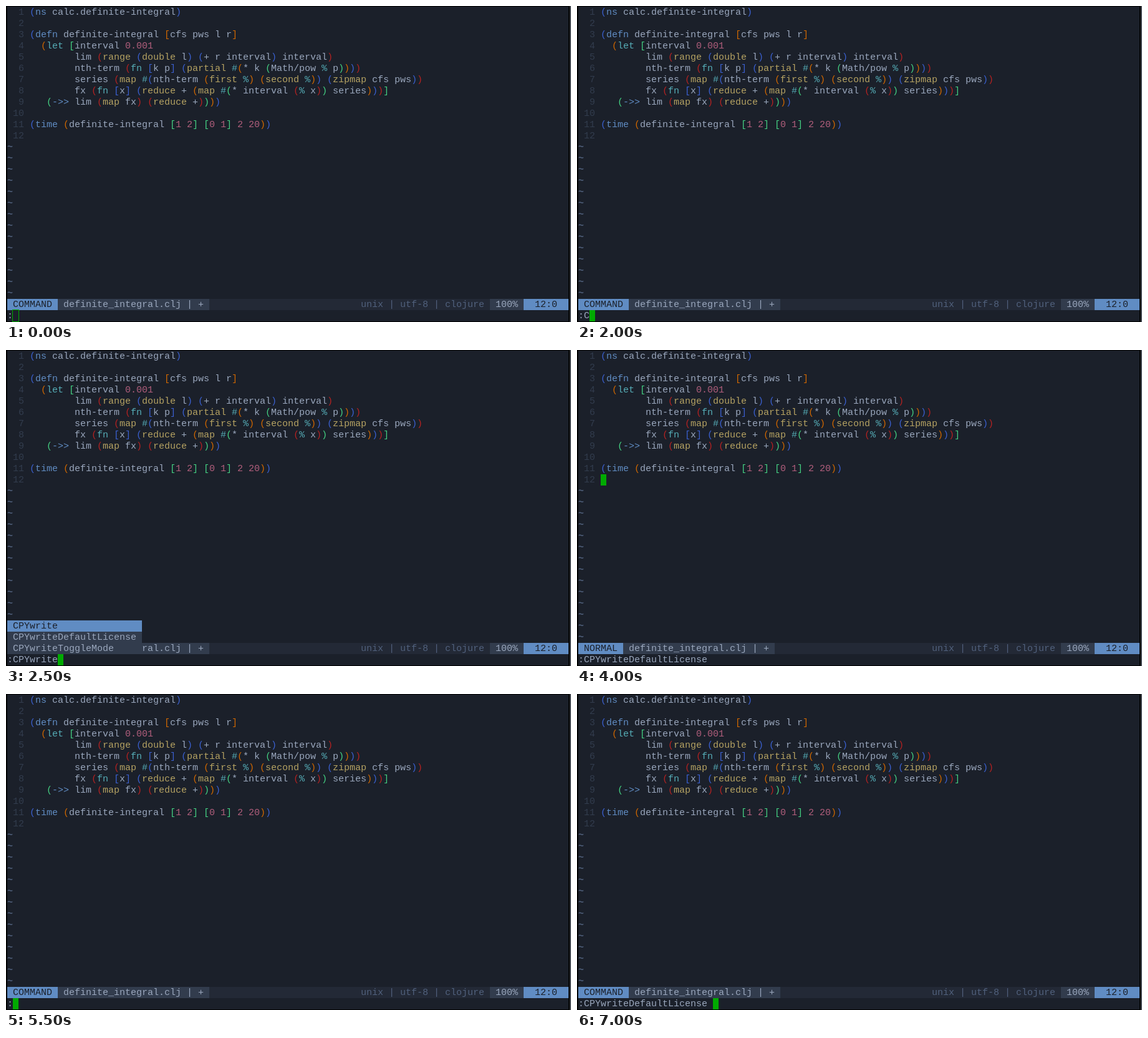
Animation of 906 by 506 pixels, one loop 8 s. Source, as an HTML page:

```html
<!DOCTYPE html>
<html lang="en">
<head>
<meta charset="utf-8">
<title>Editor session</title>
<style>
  html, body { margin: 0; width: 100%; height: 100%; overflow: hidden; background: #1b202a; }
  #stage { position: absolute; left: 0; top: 0; width: 906px; height: 506px; overflow: hidden;
    background: #1b202a; font: 15px/20px "Liberation Mono", monospace; }
  #stage span { position: absolute; height: 18px; white-space: pre; }
  #frame { position: absolute; left: 0; top: 0; width: 900px; height: 504px;
    border: solid #000; border-width: 1px 2px; }
  #edge { position: absolute; left: 904px; top: 0; width: 2px; height: 506px; background: #4a4e56; }
  #cursor { position: absolute; box-sizing: border-box; }
</style>
</head>
<body>
<div id="stage">
  <div id="frame"></div>
  <div id="edge"></div>
  <div id="code"></div>
  <div id="live"></div>
  <div id="cursor"></div>
</div>
<script>
const CELL_W = 9, CELL_H = 18, LEFT = 2, TOP = 1, LOOP = 8000;
const C = {
  bg: '#1b202a', bar: '#232936', panel: '#323c4d', dim: '#51617d', text: '#9aa7bd',
  pink: '#b15e7c', yellow: '#b5a262', blue: '#608cc3', cyan: '#56adb7', cursor: '#00aa00'
};
const RAINBOW = ['#3a5fcd', '#cd6600', '#43cd80', '#b22222'];

const CODE = `(ns calc.definite-integral)

(defn definite-integral [cfs pws l r]
  (let [interval 0.001
        lim (range (double l) (+ r interval) interval)
        nth-term (fn [k p] (partial #(* k (Math/pow % p))))
        series (map #(nth-term (first %) (second %)) (zipmap cfs pws))
        fx (fn [x] (reduce + (map #(* interval (% x)) series)))]
   (->> lim (map fx) (reduce +))))

(time (definite-integral [1 2] [0 1] 2 20))
`.split('\n');

const WORDS = {};
const paint = (color, words) => words.split(' ').forEach(w => WORDS[w] = color);
paint(C.blue, 'ns defn time ->>');
paint(C.cyan, 'let fn # %');
paint(C.yellow, 'range double partial map first second zipmap reduce');

const $ = id => document.getElementById(id);

function put(parent, row, col, text, color, bg) {
  const s = document.createElement('span');
  s.textContent = text;
  s.style.left = LEFT + col * CELL_W + 'px';
  s.style.top = TOP + row * CELL_H + 'px';
  s.style.width = text.length * CELL_W + 'px';
  s.style.color = color;
  if (bg) s.style.background = bg;
  parent.append(s);
  return s;
}

function drawCode() {
  const box = $('code');
  let depth = 0;
  CODE.forEach((line, row) => {
    put(box, row, 0, String(row + 1).padStart(3), C.panel);
    for (const m of line.matchAll(/[()\[\]]|[^\s()\[\]]+/g)) {
      const t = m[0];
      let color = WORDS[t] || (/^\d/.test(t) ? C.pink : C.text);
      if ('(['.includes(t)) color = RAINBOW[depth++ % 4];
      else if (')]'.includes(t)) color = RAINBOW[--depth % 4];
      put(box, row, 4 + m.index, t, color);
    }
  });
  for (let row = CODE.length; row < 26; row++)
    put(box, row, 0, '~', C.dim).style.fontWeight = 'bold';
}

function drawStatus(box, mode) {
  const file = ' definite_integral.clj | + ';
  const label = ` ${mode} `;
  put(box, 26, 0, ' '.repeat(100), C.dim, C.bar);
  put(box, 26, 0, label, C.bg, C.blue);
  put(box, 26, label.length, file, C.text, C.panel);
  put(box, 26, 63, 'unix | utf-8 | clojure', C.dim);
  put(box, 26, 86, ' 100% ', C.text, C.panel);
  put(box, 26, 92, '  12:0  ', C.bg, C.blue);
}

const MENU = ['CPYwrite', 'CPYwriteDefaultLicense', 'CPYwriteToggleMode'];
const FULL = ':' + MENU[1];

const STEPS = [
  { at: 0, cmd: ':', hollow: true },
  { at: 500, cmd: ':' },
  { at: 2000, cmd: ':C' },
  { at: 2500, cmd: ':' + MENU[0], pick: 0 },
  { at: 3500, cmd: FULL, pick: 1 },
  { at: 4000, cmd: FULL, normal: true },
  { at: 5500, cmd: ':' },
  { at: 6000, cmd: FULL },
  { at: 7000, cmd: FULL + ' ' }
];

function drawCursor(row, col, hollow) {
  const s = $('cursor').style, grow = hollow ? 1 : 0;
  s.left = LEFT + col * CELL_W - grow + 'px';
  s.top = TOP + row * CELL_H - grow + 'px';
  s.width = CELL_W + 2 * grow + 'px';
  s.height = CELL_H + 2 * grow + 'px';
  s.border = hollow ? '1px solid ' + C.cursor : 'none';
  s.background = hollow ? 'none' : C.cursor;
}

function drawStep(step) {
  const box = $('live');
  box.replaceChildren();
  drawStatus(box, step.normal ? 'NORMAL' : 'COMMAND');
  if (step.pick !== undefined) MENU.forEach((name, i) => {
    const on = i === step.pick;
    put(box, 24 + i, 0, (' ' + name).padEnd(24), on ? C.bg : C.text, on ? C.blue : C.panel);
  });
  put(box, 27, 0, step.cmd, C.text);
  if (step.normal) drawCursor(11, 4);
  else drawCursor(27, step.cmd.length, step.hollow);
}

let shown;
const start = performance.now();
function tick() {
  const t = (performance.now() - start) % LOOP;
  const step = STEPS.findLast(s => s.at <= t);
  if (step !== shown) drawStep(shown = step);
  requestAnimationFrame(tick);
}
drawCode();
tick();
</script>
</body>
</html>
```
